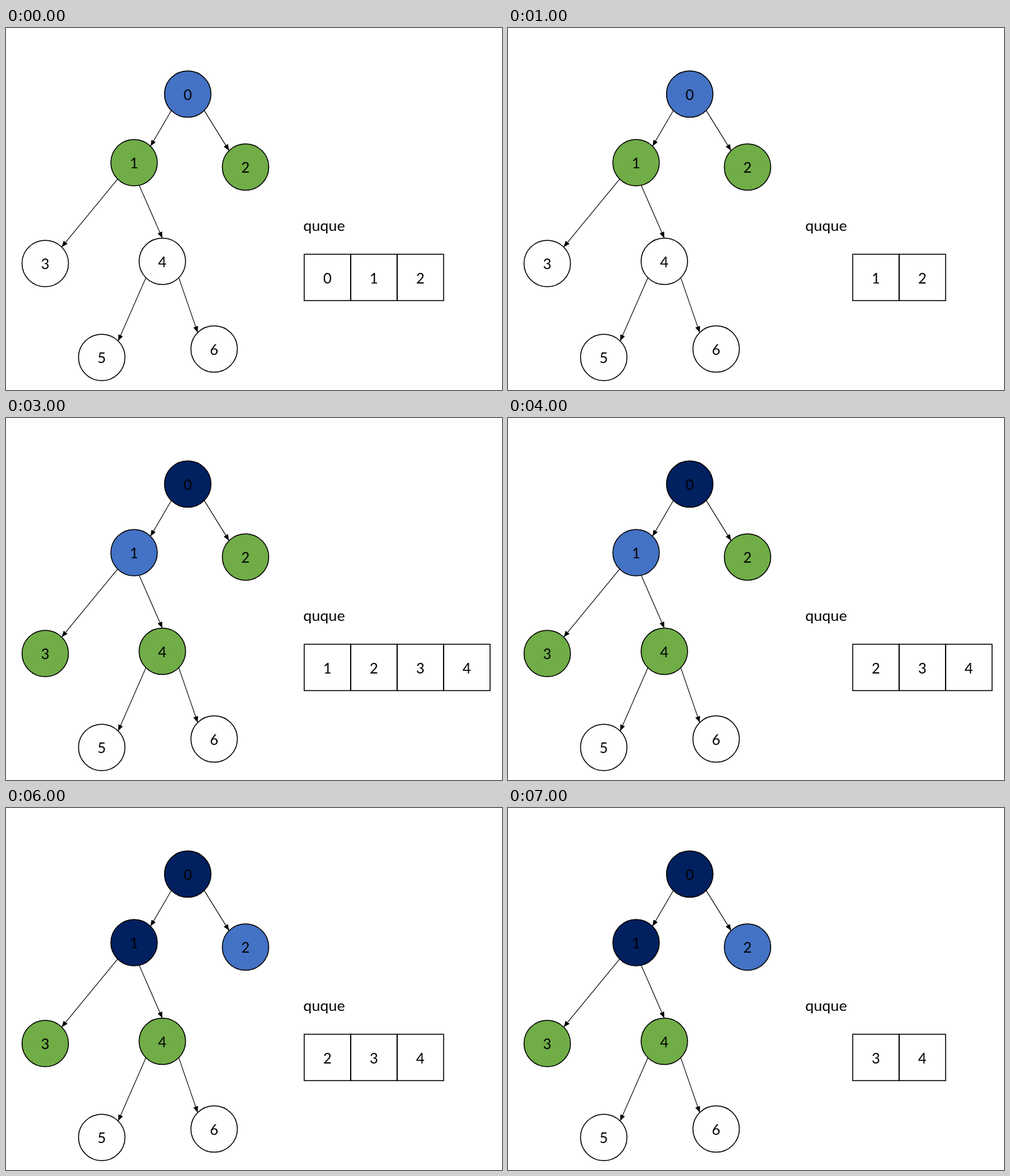
An HTML page that plays this animation: 790x578 px, repeating every 8000 ms.

```html
<!DOCTYPE html>
<html lang="en">
<head>
<meta charset="utf-8">
<title>Breadth-first search</title>
<style>
  html, body { margin: 0; width: 100%; height: 100%; overflow: hidden; background: #fff; }
  svg { display: block; }
  text { font: 24px Lato, sans-serif; }
  .digit { font-size: 23px; text-anchor: middle; }
  circle, rect { stroke: #000; stroke-width: 1.5; }
  line { stroke: #000; stroke-width: 1.1; }
</style>
</head>
<body>
<svg id="stage" width="790" height="578" viewBox="0 0 790 578">
  <defs>
    <marker id="head" markerUnits="userSpaceOnUse" markerWidth="10" markerHeight="8"
            refX="10" refY="4" orient="auto">
      <path d="M0 0L10 4L0 8Z"/>
    </marker>
  </defs>
  <text x="473.5" y="323.5">quque</text>
</svg>
<script>
const stage = document.getElementById('stage');
const STEP = 1000, STEPS = 8, PHASES = 3;
const RADIUS = 37, CELL = 74, CELLS = 4;
const QUEUE_X = 475, QUEUE_Y = 361.3;

// Nodes are numbered in breadth-first order.
const nodes = [
  { x: 289.5, y: 105.5, children: [1, 2] },
  { x: 204, y: 215, children: [3, 4] },
  { x: 381.5, y: 222 },
  { x: 62.5, y: 376 },
  { x: 249, y: 372.5, children: [5, 6], leanOut: 0.22, leanIn: 0 },
  { x: 152.5, y: 526 },
  { x: 331.5, y: 512.5 }
];

function add(tag, attrs, text = '') {
  const el = document.createElementNS('http://www.w3.org/2000/svg', tag);
  for (const name in attrs) el.setAttribute(name, attrs[name]);
  el.textContent = text;
  return stage.appendChild(el);
}

const digit = (x, y, text) => add('text', { x, y, class: 'digit' }, text);

// An arrow leaves and meets the circles at 45 degrees unless the child sets its lean.
function addArrow(parent, child) {
  const side = Math.sign(child.x - parent.x);
  const { leanOut = Math.SQRT1_2, leanIn = Math.SQRT1_2 } = child;
  const drop = lean => RADIUS * Math.sqrt(1 - lean * lean);
  add('line', {
    x1: parent.x + side * RADIUS * leanOut, y1: parent.y + drop(leanOut),
    x2: child.x - side * RADIUS * leanIn, y2: child.y - drop(leanIn),
    'marker-end': 'url(#head)'
  });
}

for (const node of nodes)
  for (const child of node.children || []) addArrow(node, nodes[child]);

const circles = nodes.map(({ x, y }, i) => {
  const circle = add('circle', { cx: x, cy: y, r: RADIUS });
  digit(x, y + 9, i);
  return circle;
});

const cells = Array.from({ length: CELLS }, (_, i) => {
  const x = QUEUE_X + i * CELL;
  const box = add('rect', { x, y: QUEUE_Y, width: CELL, height: CELL, fill: 'none' });
  return { box, label: digit(x + CELL / 2, QUEUE_Y + 46.5, '') };
});

function nodeColor(i, current, last) {
  if (i < current) return '#002060';
  if (i === current) return '#4472c4';
  return i <= last ? '#70ad47' : '#fff';
}

// Each node's turn: queue its children, empty the first cell, close the gap.
function draw(now) {
  const step = Math.floor(now / STEP) % STEPS;
  const current = Math.floor(step / PHASES), phase = step % PHASES;
  const last = Math.max(...nodes.slice(0, current + 1).flatMap(n => n.children || []));

  circles.forEach((circle, i) => circle.setAttribute('fill', nodeColor(i, current, last)));
  cells.forEach(({ box, label }, i) => {
    const value = current + i + (phase === 2 ? 1 : 0);
    const filled = value <= last && !(phase === 1 && i === 0);
    box.style.display = filled ? '' : 'none';
    label.textContent = filled ? value : '';
  });
  requestAnimationFrame(draw);
}
draw(performance.now());
</script>
</body>
</html>
```
